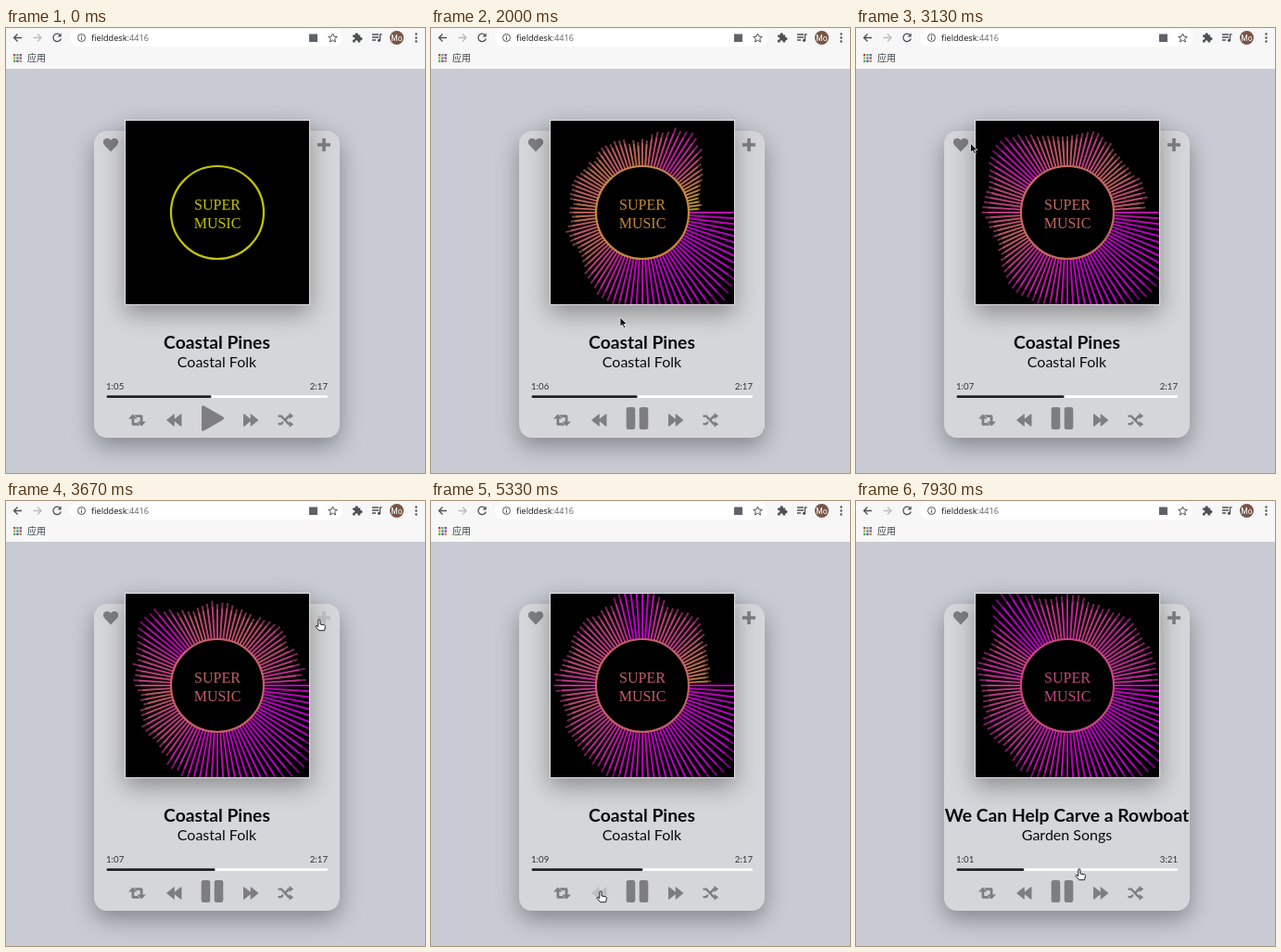
Recreate the animation shown at these times as an HTML page with a canvas. Size 452 by 480 pixels, loop 8 s.

```html
<!DOCTYPE html>
<html lang="en">
<head>
<meta charset="utf-8">
<title>Music player</title>
<style>
  html, body { margin: 0; width: 100%; height: 100%; overflow: hidden; background: #c8cbd3; }
  #stage { position: relative; width: 452px; height: 480px; overflow: hidden; }
  svg { position: absolute; left: 0; top: 0; }
  #card {
    position: absolute; left: 95px; top: 111px; width: 265px; height: 331px;
    border-radius: 14px; background: #d5d6d9; box-shadow: 0 9px 24px rgba(0, 0, 0, .34);
  }
  #cover {
    position: absolute; left: 128px; top: 99px; border: 1px solid #e6e2e8;
    box-shadow: 0 9px 24px rgba(0, 0, 0, .34);
  }
  .bar { font: 9.15px "Noto Sans", sans-serif; }
  .song { font-family: Lato, sans-serif; fill: #0b0b0c; }
  .time { font-size: 9.7px; fill: #333; }
  .icon { fill: #7e7e80; }
  .icon.over { fill: #bebfc2; }
  .line { fill: none; stroke: #4d5054; stroke-width: 1.3; }
  .thin { stroke-width: 1; }
</style>
</head>
<body>
<div id="stage">
  <div id="card"></div>
  <svg width="452" height="480" viewBox="0 0 452 480">
    <rect width="452" height="44" fill="#f7f7f7"/>
    <rect x="69" y="1" width="294" height="19" rx="9.5" fill="#fff"/>
    <path class="line" d="M17 10.5H8.5M12.5 6.5l-4 4 4 4"/>
    <path class="line" style="stroke:#b9bbbe" d="M29.5 10.5H38M34 6.5l4 4-4 4"/>
    <path class="line" d="M58.3 7.6A4.2 4.2 0 1 0 59.2 11.5"/>
    <path d="M59.6 5.5v4h-4z" fill="#4d5054"/>
    <circle class="line thin" cx="81.5" cy="10.5" r="4"/>
    <path class="line thin" d="M81.5 10v2.8M81.5 8v1.1"/>
    <text class="bar" x="92" y="13.8" fill="#202124">fielddesk<tspan fill="#6b6e72">:4416</tspan></text>
    <rect x="327" y="6.5" width="9" height="8.5" fill="#5f6368"/>
    <path class="line thin" d="M352.5 6l1.4 3.1 3.4.3-2.6 2.2.8 3.4-3-1.8-3 1.8.8-3.4-2.6-2.2 3.4-.3z"/>
    <path fill="#4d5054" d="M374 7.5h2.6a1.7 1.7 0 1 1 3.2 0h2.4v2.6a1.7 1.7 0 1 1 0 3.2v2.2h-2.6a1.6 1.6 0 1 0-3 0H374v-2.8a1.6 1.6 0 1 0 0-2.9z"/>
    <path class="line" d="M395 7h7M395 10h7M395 13h4M403.5 13V6.8h2.2"/>
    <circle cx="402.5" cy="13.3" r="1.6" fill="#4d5054"/>
    <circle cx="421.5" cy="10.5" r="7.5" fill="#795548"/>
    <text x="421.5" y="13.7" text-anchor="middle" fill="#fff" style="font:8.5px Roboto, sans-serif">Mo</text>
    <path d="M442.5 6.5v0m0 4v0m0 4v0" stroke="#4d5054" stroke-width="2.4" stroke-linecap="round"/>
    <g id="apps"></g>
    <text x="23" y="36" fill="#3c4043" style="font:10px 'Noto Sans CJK SC', 'Noto Sans CJK', sans-serif">应用</text>

    <path id="heart" class="icon" d="M113 133.5l-6.7-7c-2-2.1-1.9-5 0-6.5 1.9-1.5 4.7-1.1 6.7 1 2-2.1 4.8-2.5 6.7-1 1.9 1.5 2 4.4 0 6.5z"/>
    <path id="plus" class="icon" d="M341.2 119h3.6v5.2h5.2v3.6h-5.2v5.2h-3.6v-5.2H336v-3.6h5.2z"/>

    <text id="title" class="song" x="227.5" y="346" text-anchor="middle" font-size="19.3" font-weight="700"></text>
    <text id="genre" class="song" x="227.5" y="366" text-anchor="middle" font-size="16"></text>
    <text id="now" class="song time" x="108" y="390"></text>
    <text id="total" class="song time" x="347" y="390" text-anchor="end"></text>
    <rect id="track" x="108.5" y="396.3" width="238.5" height="2.7" rx="1.3" fill="#fff"/>
    <rect id="done" x="108.5" y="396.3" height="2.7" rx="1.3" fill="#202124"/>

    <path id="repeat" class="icon" d="M132 421.5l4.8-4.9 4.8 4.9h-3.3v4.6h3.8l2.6 2.7h-7.7q-1.5 0-1.5-1.5v-5.8zM151 424.5l-4.8 4.9-4.8-4.9h3.3v-4.6h-3.8l-2.6-2.7h7.7q1.5 0 1.5 1.5v5.8z"/>
    <path id="back" class="icon" d="M173 423l8-6.6q.8-.5.8.5v4.9l6.5-5.4q1.2-.6 1.2.6v12q0 1.200-1.200.6l-6.500-5.400v4.900q0 1-.8.5z"/>
    <path id="play" class="icon" d="M211 409.500q0-3.200 2.900-1.700l20 11.500q2.300 1.700 0 3.400l-20 11.500q-2.900 1.500-2.900-1.700z"/>
    <g id="pause" class="icon">
      <rect x="210.700" y="409" width="9.600" height="24" rx="2.300"/>
      <rect x="224.700" y="409" width="9.600" height="24" rx="2.300"/>
    </g>
    <path id="next" class="icon" d="M272.500 423l-8-6.600q-.8-.5-.8.5v4.900l-6.500-5.400q-1.200-.6-1.200.6v12q0 1.200 1.200.6l6.500-5.400v4.900q0 1 .8.5z"/>
    <path id="shuffle" class="icon" d="M293.500 417.500h4l8 8.600v-2.100l4.700 3.400-4.700 3.300v-2.400h-1.200l-8-8.500h-2.800zM293.500 428.300v-2.300h2.800l1.800-1.900 1.600 1.700-2.300 2.500zM301 421.200l3.300-3.700h1.200V415l4.700 3.500-4.700 3.400v-2.100l-2.800 3.100z"/>
  </svg>
  <canvas id="cover" width="198" height="198"></canvas>
  <svg width="452" height="480" viewBox="0 0 452 480">
    <g id="cursor" stroke-linejoin="round">
      <path id="arrow" d="M0 0v10.200l2.400-2.100 1.700 3.700 1.700-.8-1.600-3.500h3.300z" fill="#141414" stroke="#f4f4f4" stroke-width=".8"/>
      <path id="hand" d="M-1.200 1q0-1.200 1.100-1.200T1 1v4l4.300.8q1.200.3 1.200 1.500l-.9 4.400h-6l-3.500-4.100q-.3-1.200.8-1.200l1.900 1.200z" fill="#fff" stroke="#202020"/>
    </g>
  </svg>
</div>
<script>
const LOOP = 8000, STEP = 200 / 3;
const PLAY = 1060, SOUND = 1330, STOP = 5600, SWITCH = 5800, SEEK = 7440;
const BARS = 100, RADIUS = 50, MID = 99;
const $ = id => document.getElementById(id);
const ctx = $("cover").getContext("2d");

const songs = [
  { title: "Coastal Pines", genre: "Coastal Folk", length: 137 },
  { title: "We Can Help Carve a Rowboat", genre: "Garden Songs", length: 201 }
];

// Spectrum at key times: middle length, place of the peak, length at the high end, loudness.
const moods = [
  { at: 2000, body: 30, peak: .84, tail: 14, loud: 60 },
  { at: 2533, body: 35, peak: .61, tail: 18, loud: 84 },
  { at: 3667, body: 37, peak: .61, tail: 44, loud: 100 },
  { at: 5333, body: 41, peak: .74, tail: 22, loud: 102 },
  { at: 7933, body: 45, peak: .65, tail: 48, loud: 125 }
];

// Pointer moves: start, end, goal.
const moves = [
  [300, 800, 224, 422], [1450, 2000, 204, 312], [2000, 2533, 157, 191],
  [2533, 2800, 112, 124], [3080, 3470, 338, 128], [4060, 4500, 301, 421],
  [4500, 5150, 183, 421], [6280, 6560, 183, 396], [7500, 7860, 241, 397]
];

const mix = (a, b, k) => a + (b - a) * k;
const bump = (x, width) => Math.exp(-x * x / (width * width));
const noise = n => { const s = Math.sin(n * 127.1) * 43758.5; return s - Math.floor(s); };
const clock = s => Math.floor(s / 60) + ":" + String(s % 60).padStart(2, "0");

function ramp(t, from, to) {
  const k = Math.max(0, Math.min(1, (t - from) / (to - from)));
  return k * k * (3 - 2 * k);
}

function volume(t) {
  return t < SEEK
    ? ramp(t, SOUND, 1600) * (1 - ramp(t, STOP - 100, 6000))
    : ramp(t, SEEK, 7670);
}

// Bass fills the first third, then an even body with one peak and a falling end.
function barSize(mood, i) {
  const u = i / BARS;
  const bass = 58 + 20 * bump(u - .125, .07);
  const waves = 3.5 * Math.sin(i * .55 + mood.at);
  const body = mood.body + waves + 23 * bump(u - mood.peak, .045);
  const size = mix(bass, body, ramp(u, .27, .43));
  return mix(size, mood.tail, ramp(u, .85, .98)) + 5 * noise(i + mood.at) - 2.5;
}

function tone(v) {
  v = Math.round(Math.min(205, v));
  return `rgb(196,${Math.max(0, 196 - v)},${v})`;
}

function ray(angle, size, color, alpha) {
  const c = Math.cos(angle), s = Math.sin(angle);
  ctx.globalAlpha = alpha;
  ctx.strokeStyle = color;
  ctx.beginPath();
  ctx.moveTo(MID + c * RADIUS, MID + s * RADIUS);
  ctx.lineTo(MID + c * (RADIUS + size), MID + s * (RADIUS + size));
  ctx.stroke();
}

function drawCover(t) {
  const n = moods.findIndex(m => m.at >= t - 1);
  const b = moods[n < 0 ? moods.length - 1 : n], a = moods[Math.max(0, n - 1)];
  const k = t < SEEK ? ramp(t, a.at, Math.min(b.at, SEEK)) : 1;
  const gain = volume(t);

  ctx.globalAlpha = 1;
  ctx.fillStyle = "#000";
  ctx.fillRect(0, 0, 2 * MID, 2 * MID);
  ctx.lineWidth = 1.9;

  for (let i = 0; i < BARS && gain > 0; i++) {
    const sway = 5 * Math.sin(Math.PI * k) * Math.sin(i * .42 + t / 130);
    const size = Math.max(0, mix(barSize(a, i), barSize(b, i), k) + sway) * gain;
    const angle = i * 2 * Math.PI / BARS, color = tone(size * 3.2);
    ray(angle, size, color, .65);
    ray(angle, size * .85, color, .8);
  }

  ctx.globalAlpha = 1;
  ctx.lineWidth = 2.2;
  ctx.strokeStyle = ctx.fillStyle = tone(mix(a.loud, b.loud, k) * gain);
  ctx.beginPath();
  ctx.arc(MID, MID, RADIUS, 0, Math.PI * 2);
  ctx.stroke();
  ctx.font = '16px "Liberation Serif", serif';
  ctx.textAlign = "center";
  ctx.fillText("SUPER", MID, 95.5);
  ctx.fillText("MUSIC", MID, 115.5);
}

function position(t) {
  if (t < SWITCH) return 64.9 + Math.max(0, t - SOUND) / 1000;
  return t < SEEK ? (t - 5700) / 1000 : 60.9 + (t - SEEK) / 1000;
}

function drawSong(t) {
  const song = songs[t < SWITCH ? 0 : 1], pos = position(t);
  $("title").textContent = song.title;
  $("genre").textContent = song.genre;
  $("now").textContent = clock(Math.round(pos));
  $("total").textContent = clock(song.length);
  $("done").setAttribute("width", 238.5 * pos / song.length);
  $("play").style.display = t < PLAY ? "" : "none";
  $("pause").style.display = t < PLAY ? "none" : "";
}

const targets = [...document.querySelectorAll(".icon, #track")]
  .map(el => ({ el, box: el.getBBox() }));

function inside({ x, y, width, height }, px, py) {
  return px > x - 2 && px < x + width + 2 && py > y - 2 && py < y + height + 2;
}

function drawCursor(t) {
  const shown = t > 60;
  let x = 266, y = 340, hot = false;
  for (const [from, to, goalX, goalY] of moves) {
    const k = ramp(t, from, to);
    x = mix(x, goalX, k);
    y = mix(y, goalY, k);
  }
  for (const { el, box } of targets) {
    const over = shown && inside(box, x, y);
    el.classList.toggle("over", over);
    hot = hot || over;
  }
  $("cursor").setAttribute("transform", `translate(${x} ${y})`);
  $("cursor").style.display = shown ? "" : "none";
  $("arrow").style.display = hot ? "none" : "";
  $("hand").style.display = hot ? "" : "none";
}

for (let i = 0; i < 9; i++) {
  const x = 8 + i % 3 * 3.3, y = 28 + Math.floor(i / 3) * 3.3;
  $("apps").insertAdjacentHTML("beforeend",
    `<rect x="${x}" y="${y}" width="2.3" height="2.3" fill="hsl(${i * 140},45%,48%)"/>`);
}

function frame() {
  const now = performance.now() % LOOP;
  const t = Math.floor((now + 5) / STEP) * STEP % LOOP;
  drawCover(t);
  drawSong(t);
  drawCursor(t);
  requestAnimationFrame(frame);
}
frame();
</script>
</body>
</html>
```
